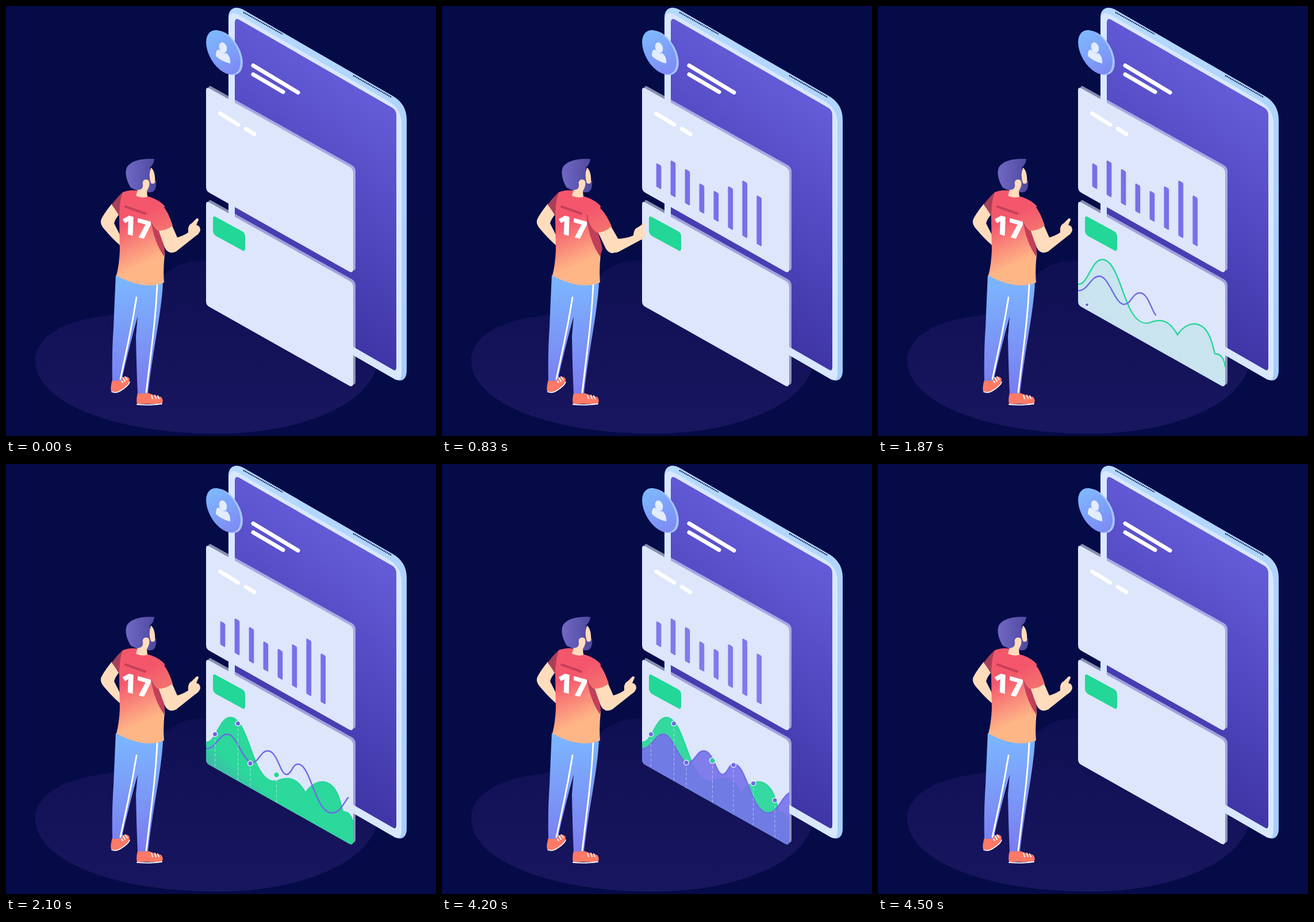
An HTML page for the animation above (5010 ms loop, 748 px wide and 748 px high).

```html
<!DOCTYPE html>
<html lang="en">
<head>
<meta charset="utf-8">
<title>Dashboard</title>
<style>
  html, body { margin: 0; width: 100%; height: 100%; overflow: hidden; background: #050b47; }
  svg { display: block; width: 100vw; height: 100vh; }
  .line { fill: none; stroke-width: 2.4; stroke-dasharray: 1 2; }
  .round { fill: none; stroke-linecap: round; }
  .skin { fill: #ffdcbc; }
</style>
</head>
<body>
<svg viewBox="0 0 748 748">
  <defs>
    <linearGradient id="floor" gradientUnits="userSpaceOnUse" x1="340" y1="440" x2="340" y2="744">
      <stop stop-color="#0f0f53"/><stop offset="1" stop-color="#18165f"/>
    </linearGradient>
    <linearGradient id="edge" gradientUnits="userSpaceOnUse" x1="400" y1="0" x2="697" y2="650">
      <stop stop-color="#b6d9ff"/><stop offset="1" stop-color="#a6cdff"/>
    </linearGradient>
    <linearGradient id="screen" gradientUnits="userSpaceOnUse" x1="640" y1="160" x2="390" y2="510">
      <stop stop-color="#645bd8"/><stop offset="1" stop-color="#392f9f"/>
    </linearGradient>
    <linearGradient id="disc" x1="0" y1="0" x2="1" y2="1">
      <stop offset=".1" stop-color="#7fbcff"/><stop offset="1" stop-color="#7d80f2"/>
    </linearGradient>
    <linearGradient id="hair" x1="0" y1="0" x2="1" y2="0">
      <stop stop-color="#7068c4"/><stop offset="1" stop-color="#4f489e"/>
    </linearGradient>
    <linearGradient id="shirt" gradientUnits="userSpaceOnUse" x1="215" y1="375" x2="247" y2="446">
      <stop stop-color="#f4576c"/><stop offset="1" stop-color="#ffb687"/>
    </linearGradient>
    <linearGradient id="sleeve" gradientUnits="userSpaceOnUse" x1="262" y1="348" x2="280" y2="392">
      <stop stop-color="#f4576c"/><stop offset="1" stop-color="#f4756f"/>
    </linearGradient>
    <linearGradient id="trousers" x1="0" y1="0" x2="0" y2="1">
      <stop stop-color="#7cb8ff"/><stop offset="1" stop-color="#7a7cf0"/>
    </linearGradient>
    <linearGradient id="hill" gradientUnits="userSpaceOnUse" x1="360" y1="550" x2="420" y2="480">
      <stop stop-color="#43a9b2"/><stop offset=".5" stop-color="#24d797"/>
    </linearGradient>
    <path id="card" d="M348 147Q348 140 354 143.500L598 280Q604 284 604 291V457Q604 465.500 597 462L354 325Q348 322 348 315Z"/>
    <clipPath id="lower"><use href="#card" y="198.500"/></clipPath>
  </defs>

  <rect width="748" height="748" fill="#050b47"/>
  <path fill="url(#floor)" d="M51 617C51 575 100 549 165 540C225 532 240 510 262 483C285 455 310 443 340 443C440 443 520 500 560 540C620 580 650 610 643 633C620 700 500 744 368 744C190 744 51 690 51 617Z"/>

  <!-- tablet -->
  <path fill="url(#edge)" d="M387 20C387 5 398-1 412 6L672 156Q697 170 697 198V634C697 650 688 655 676 649L387 482Z"/>
  <path fill="#d9e8ff" d="M387 25C387 14 394 10 402 14L664 165Q688 179 688 204V638Q688 655 676 649L387 482Z"/>
  <path fill="url(#screen)" d="M398 30Q398 19 406 24L672 177Q679 181 679 190V628Q679 637 672 632L398 474Z"/>
  <path fill="none" stroke="#0b1150" stroke-width="2.200" stroke-dasharray="2 1.200" d="M413 11L481 49M604 121L671 159"/>
  <path class="round" stroke="#fff" stroke-width="7" d="M430 103.500L508 150.500M430 119L482 149.500"/>

  <!-- avatar -->
  <circle r="34.500" fill="#a4c6ff" transform="matrix(.866 .5 0 1 382 81.500)"/>
  <circle r="34.500" fill="url(#disc)" transform="matrix(.866 .5 0 1 378 80.500)"/>
  <g fill="#e3edff">
    <ellipse cx="377.500" cy="72.500" rx="6.500" ry="9.500" transform="rotate(-18 377.500 72.500)"/>
    <path d="M365 87C365 77 368 74 372 77Q378 84 383 82C388 85 391 92 390 100Q376 97 365 87Z"/>
  </g>

  <!-- cards -->
  <g fill="#dde6fa">
    <use href="#card" x="4" y="-3" opacity=".6"/><use href="#card"/>
    <use href="#card" x="4" y="195.500" opacity=".6"/><use href="#card" y="198.500"/>
  </g>
  <path class="round" stroke="#fff" stroke-width="7" d="M372.500 187L404 206.500M417 213.500L432 223"/>

  <g id="bars" fill="#7671ea"></g>

  <g id="chart" clip-path="url(#lower)">
    <path id="greenFill" fill="url(#hill)"/>
    <path id="greenLine" class="line" stroke="#24d797" pathLength="1"/>
    <path id="purpleFill" fill="#7772ec"/>
    <path id="purpleLine" class="line" stroke="#7069e6" pathLength="1"/>
  </g>
  <g id="dots"></g>
  <path id="button" fill="#22d797" d="M360 371Q360 364 365 367L411 392Q416 395 416 401V421Q416 428 411 425L365 400Q360 396 360 391Z"/>

  <!-- person -->
  <path class="skin" d="M184 344Q168 364 165 373Q164 380 170 387Q185 405 198 416V398L188 378Q190 370 198 361Z"/>
  <path fill="#a83f58" d="M203 324Q190 336 184 346Q190 353 198 367Z"/>
  <path fill="#ff7a66" d="M185 650Q181 665 183 670Q190 673 197 670Q215 659 215 649Q212 644 207 645L199 650Z"/>
  <path fill="#ff7a66" d="M229 673Q226 685 228 692H271Q275 686 270 680Q259 678 247 673Z"/>
  <path class="round" stroke="#fff" stroke-width="1.800" d="M184 671Q191 674 198 670Q213 661 215 654M228 693Q250 695 271 692M198 648l5 7M203 646l4 7M207 645l4 5M253 677l2 6M259 677l2 6M264 678l2 5"/>
  <path fill="url(#trousers)" d="M191 468Q235 492 273 480Q272 510 262 570Q252 630 247 674H229Q227 630 226 575L229 540Q215 590 201 652H185Q184 600 187 560Q189 510 191 468Z"/>
  <path class="round" stroke="#fff" stroke-width="2.800" d="M227 507Q221 545 213 583L199 649M263 485Q261 530 254 588L244 672"/>
  <path fill="url(#shirt)" d="M203 324Q215 319 228 321Q229 332 246 331Q265 336 276 348L268 385L276 432Q273 460 275 481Q240 495 192 469Q197 450 198 425L197 370Q197 340 203 324Z"/>
  <path class="round" stroke="#c6405a" stroke-width="4" d="M208 349L242 361"/>
  <text transform="matrix(.97 .27 -.04 1 200 394)" font-family="'Open Sans', sans-serif" font-weight="800" font-size="46" fill="#fff">17</text>
  <path fill="url(#hair)" d="M217 316C207 300 206 283 213 277C222 268 238 265 258 266C257 275 253 279 250 281L254 305L261 303C262 318 259 325 248 324L228 321Z"/>
  <path class="skin" d="M252 281C258 285 260 297 259 307Q256 311 252 308Q249 300 250 290Z"/>
  <path class="skin" d="M238 310C236 302 246 299 249 305C251 312 247 318 245 322L246 332Q236 335 226 330L229 320C234 320 239 318 238 310Z"/>
  <path id="shade" fill="#c23f5a"/>
  <g id="upperArm">
    <g id="forearm">
      <path class="skin" d="M288 405Q305 402 317 394Q316 384 320 380L323 378L331 370Q335 368 335 372L331 381Q338 382 338 390Q336 397 330 400L296 427Q284 433 278 422Z"/>
    </g>
    <path class="skin" d="M264 386L288 380L299 405Q297 427 287 429Q280 428 276 420Z"/>
    <path fill="url(#sleeve)" d="M251 367C249 350 257 342 270 346Q280 352 290 382Q279 391 264 391Q253 382 251 367Z"/>
  </g>
</svg>
<script>
const LOOP = 5010;
const $ = id => document.getElementById(id);
const progress = (t, from, to) => Math.min(1, Math.max(0, (t - from) / (to - from)));
const smooth = x => x * x * (3 - 2 * x);
const easeOut = x => 1 - (1 - x) ** 3;

function add(parent, tag, attrs) {
  const el = document.createElementNS("http://www.w3.org/2000/svg", tag);
  for (const key in attrs) el.setAttribute(key, attrs[key]);
  return parent.appendChild(el);
}

// Bars: top of the left edge; the feet follow the slope of the card.
const bars = [274, 269, 284, 309, 322, 314, 304, 330].map((top, i) => ({
  x: 372.7 + i * 24.95, top, foot: 314 + i * 14.2, el: add($("bars"), "path", {})
}));

function barPath({ x, top, foot }, grow) {
  const h = (foot - top) * grow;
  if (h < 1) return "";
  const r = Math.min(2, h / 2), y = foot - h;
  return `M${x} ${y + r}q0 ${-r - 1} 2 ${-r}l4.700 2.700q2 1 2 ${r + 1}V${foot + 5 - r}q0 ${r} -2 ${r - 1}l-4.700 -2.700q-2 -1 -2 -${r}Z`;
}

const curves = {
  green: "M348 484C365 486 371 441 390 441C414 441 424 502 440 530C452 552 466 555 478 549C500 542 512 556 521 572C532 555 546 551 557 554C577 560 582 590 586 605C597 604 603 616 604 628",
  purple: "M348 495C364 497 370 470 385 470C402 470 412 519 428 519C440 519 443 499 455 499C473 499 476 540 488 540C497 540 498 522 508 522C530 522 538 607 567 607C585 607 588 582 604 572"
};
for (const name in curves) {
  $(name + "Line").setAttribute("d", curves[name]);
  $(name + "Fill").setAttribute("d", curves[name] + "V670H348Z");
}

const dots = [[363.5, 470], [403.5, 451.5], [425, 519.5], [470.5, 516], [507, 523.5], [541.5, 555.5], [579, 585]]
  .map(([x, y], i) => {
    const group = add($("dots"), "g", {});
    const stem = add(group, "line", { x1: x, x2: x, stroke: "#fff", "stroke-opacity": .55, "stroke-dasharray": "5 3.5" });
    const ball = add(group, "circle", { cx: x, fill: i === 3 ? "#24d797" : "#6c64e4", stroke: "#eef2ff", "stroke-width": 1.5 });
    return { y, foot: 523.5 + (x - 354) * .564, size: i === 3 ? 5 : 4.3, start: 1862 + i * 63, group, stem, ball };
  });

function drawLine(id, p) {
  $(id).style.strokeDashoffset = 1 - p;
  $(id).style.opacity = p > 0 ? 1 : 0;
}

function moveArm(t) {
  const k = 1.15 * easeOut(progress(t, 700, 960)) * (1 - smooth(progress(t, 1130, 1560)));
  $("upperArm").setAttribute("transform", `translate(${3 * k} ${4 * k}) rotate(${-6 * k} 262 362)`);
  $("forearm").setAttribute("transform", `translate(${4 * k} ${-k}) rotate(${16 * k} 287 416)`);
  $("shade").setAttribute("d", `M251 362Q${268 + 3 * k} 382 ${276 + 3 * k} ${424 - 2 * k}L275 436Q254 405 251 362Z`);
  const press = 1 - .06 * Math.sin(Math.PI * progress(t, 930, 1200));
  $("button").setAttribute("transform", `translate(388 396) scale(${press}) translate(-388 -396)`);
}

function render(t) {
  const visible = 1 - progress(t, 4170, 4500);
  const grow = smooth(progress(t, 15, 400));
  for (const bar of bars) bar.el.setAttribute("d", barPath(bar, grow));
  $("bars").style.opacity = visible;

  moveArm(t);

  drawLine("greenLine", progress(t, 1256, 1775));
  drawLine("purpleLine", progress(t, 1620, 2115));
  $("greenFill").style.opacity = progress(t, 1843, 2112) * visible;
  $("purpleFill").style.opacity = progress(t, 2150, 2465) * visible;
  if (visible < 1) for (const name in curves) $(name + "Line").style.opacity = visible;

  for (const { y, foot, size, start, group, stem, ball } of dots) {
    const p = easeOut(progress(t, start, start + 165));
    const top = foot + (y - foot) * p;
    group.style.opacity = p > 0 ? visible : 0;
    stem.setAttribute("y1", top);
    stem.setAttribute("y2", foot);
    ball.setAttribute("cy", top);
    ball.setAttribute("r", size * Math.min(1, .6 + p));
  }
}

const began = performance.now();
function tick() {
  render((performance.now() - began) % LOOP);
  requestAnimationFrame(tick);
}
tick();
</script>
</body>
</html>
```
